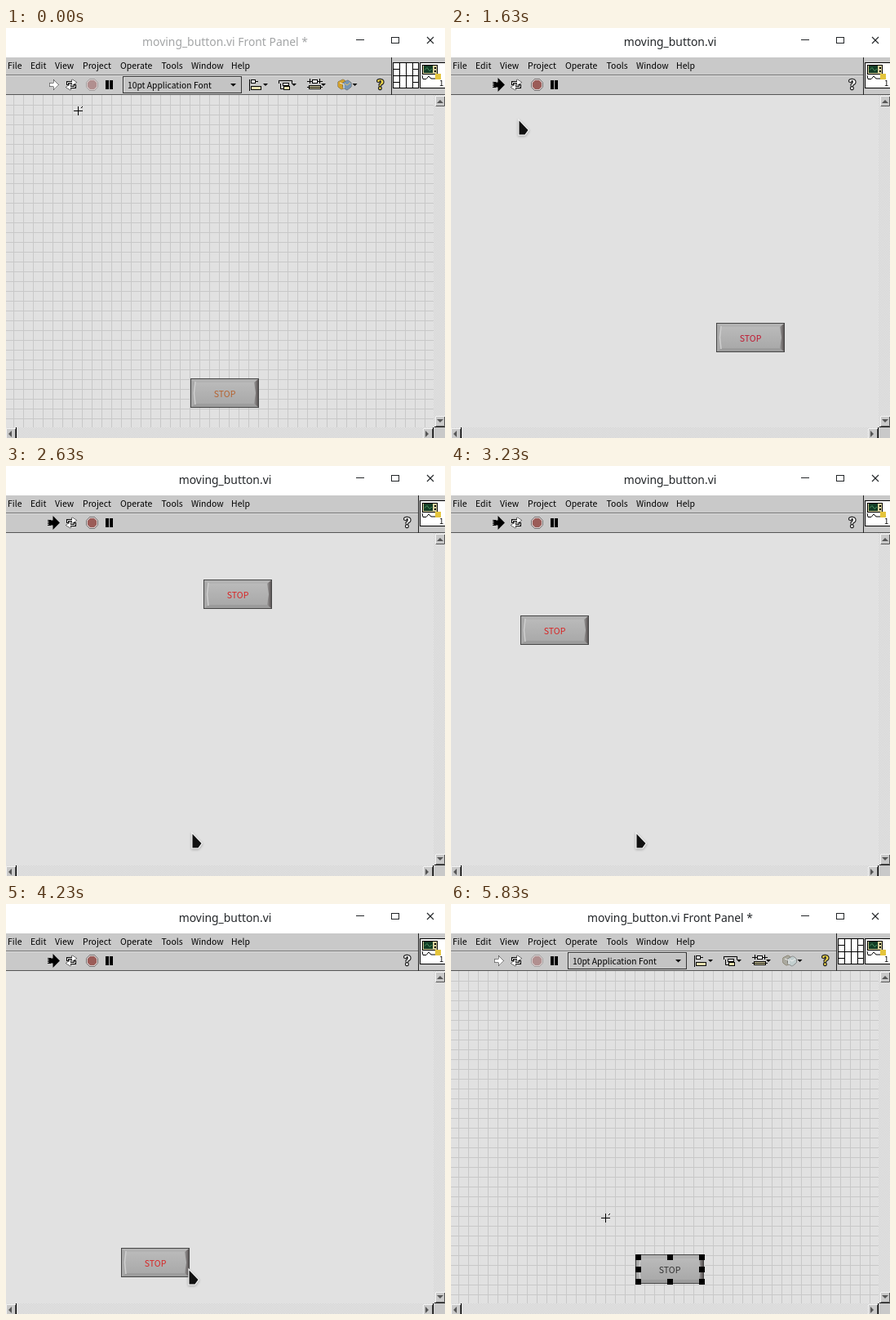
An HTML page with a canvas for the animation above (6030 ms loop, 538 by 502 pixels).

```html
<!DOCTYPE html>
<html lang="en">
<head>
<meta charset="utf-8">
<title>moving_button.vi</title>
<style>
html, body { margin: 0; width: 100%; height: 100%; overflow: hidden; background: #fff; }
canvas { display: block; }
</style>
</head>
<body>
<canvas id="stage" width="538" height="502"></canvas>
<script>
const ctx = document.getElementById('stage').getContext('2d');
const LOOP = 6030;
const UI = '"Noto Sans CJK JP", "Noto Sans CJK SC", "Noto Sans", sans-serif';
const GREY = '#c9c9c9', INK = '#000';
const RUN_START = 6, RUN_END = 23;
const HOME = [226, 429];

function box(x, y, w, h, color) {
  ctx.fillStyle = color;
  ctx.fillRect(x, y, w, h);
}

function frame(x, y, w, h, color, fill) {
  if (fill) box(x, y, w, h, fill);
  ctx.strokeStyle = color;
  ctx.lineWidth = 1;
  ctx.strokeRect(x + 0.5, y + 0.5, w - 1, h - 1);
}

function poly(points, fill, stroke, width = 1) {
  ctx.beginPath();
  for (let i = 0; i < points.length; i += 2) ctx.lineTo(points[i], points[i + 1]);
  ctx.closePath();
  if (stroke) {
    ctx.strokeStyle = stroke;
    ctx.lineWidth = width;
    ctx.stroke();
  }
  if (fill) {
    ctx.fillStyle = fill;
    ctx.fill();
  }
}

function path(points, color = INK, width = 1) {
  ctx.beginPath();
  for (let i = 0; i < points.length; i += 2) ctx.lineTo(points[i], points[i + 1]);
  ctx.strokeStyle = color;
  ctx.lineWidth = width;
  ctx.stroke();
}

function label(str, x, y, size, color = INK, align = 'left', family = UI) {
  ctx.font = size + 'px ' + family;
  ctx.textAlign = align;
  ctx.fillStyle = color;
  ctx.fillText(str, x, y);
}

const lerp = (a, b, k) => a + (b - a) * k;

// keys: [step, x, y]
function along(keys, n) {
  let i = 0;
  while (i < keys.length - 2 && n > keys[i + 1][0]) i++;
  const a = keys[i], b = keys[i + 1];
  const k = Math.min(1, Math.max(0, (n - a[0]) / (b[0] - a[0])));
  return [Math.round(lerp(a[1], b[1], k)), Math.round(lerp(a[2], b[2], k))];
}

const checker = (() => {
  const tile = document.createElement('canvas');
  tile.width = tile.height = 2;
  const c = tile.getContext('2d');
  c.fillStyle = '#f0f0f0';
  c.fillRect(0, 0, 2, 2);
  c.fillStyle = GREY;
  c.fillRect(0, 0, 1, 1);
  c.fillRect(1, 1, 1, 1);
  return ctx.createPattern(tile, 'repeat');
})();

function titleBar(n, running) {
  box(0, 0, 538, 36, '#fff');
  const text = running ? 'moving_button.vi' : 'moving_button.vi Front Panel *';
  label(text, 268.5, 22, 13.9, n < 2 ? '#a3a5a6' : '#232629', 'center', '"Noto Sans", sans-serif');
  box(429, 14, 10, 1, '#232629');
  frame(472, 11, 10, 8, '#232629');
  path([516, 11, 524, 19], '#232629', 1.1);
  path([524, 11, 516, 19], '#232629', 1.1);
}

function menuBar() {
  box(0, 36, 538, 46, GREY);
  const items = [['File', 2], ['Edit', 30], ['View', 60], ['Project', 94],
    ['Operate', 140], ['Tools', 190.5], ['Window', 227], ['Help', 276]];
  for (const [text, x] of items) label(text, x, 50, 10.5);
}

function runArrow(running, hover) {
  if (hover) frame(49, 59, 19, 21, '#222', '#d8d8d8');
  const arrow = [53.5, 67.5, 58.5, 67.5, 58.5, 63.5, 64.5, 69.5, 58.5, 75.5, 58.5, 71.5, 53.5, 71.5];
  poly(arrow, running ? INK : '#fff', INK, running ? 2 : 1);
  if (running) for (let y = 66; y < 74; y += 2) box(51, y, 4, 1, INK);
}

function loopArrows() {
  path([75.5, 70, 75.5, 66.5, 82, 66.5], INK, 3);
  path([84.5, 69, 84.5, 72.5, 78, 72.5], INK, 3);
  poly([81, 63, 86.5, 66.5, 81, 70], '#fff', INK);
  poly([79, 69, 73.5, 72.5, 79, 76], '#fff', INK);
  path([75.5, 69, 75.5, 66.5, 82, 66.5], '#fff');
  path([84.5, 70, 84.5, 72.5, 78, 72.5], '#fff');
}

function abortButton(running) {
  poly([102.5, 62.5, 108.5, 62.5, 112.5, 66.5, 112.5, 72.5, 108.5, 76.5, 102.5, 76.5, 98.5, 72.5, 98.5, 66.5],
    '#d6cccc', running ? '#222' : '#777');
  poly([103, 64, 108, 64, 111, 67, 111, 72, 108, 75, 103, 75, 100, 72, 100, 67],
    running ? '#9b5c58' : '#b18f8f');
}

function caret(x, y, half = 3) {
  poly([x - half, y, x + half, y, x, y + half], INK);
}

function editTools(n) {
  frame(143, 59, 146, 21, '#333', '#c4c4c4');
  path([144.5, 78, 144.5, 60.5, 287, 60.5], '#dedede');
  label('10pt Application Font', 149, 74, 10.3);
  caret(278.5, 68, 3.5);

  // align
  box(298, 63, 1, 14, INK);
  frame(300, 63, 6, 5, INK, '#fff');
  frame(300, 71, 13, 5, INK, '#e8e1b0');
  box(306, 65, 3, 1, INK);
  caret(318, 68);
  // distribute
  box(334, 64, 17, 1, INK);
  box(334, 64, 1, 4, INK);
  box(350, 64, 1, 4, INK);
  frame(339, 67, 8, 4, INK, '#fff');
  path([336.5, 68, 336.5, 74.5, 340, 74.5], INK);
  frame(340, 71, 8, 5, INK, '#e8e1b0');
  caret(353, 68);
  // resize
  box(372, 62, 1, 6, INK);
  box(384, 62, 1, 6, INK);
  box(369, 65, 19, 1, INK);
  frame(375, 63, 7, 5, INK, '#fff');
  frame(371, 70, 15, 5, INK, '#e8e1b0');
  box(369, 72, 19, 1, INK);
  caret(389, 68);
  // reorder
  const vivid = n < RUN_START;
  const gold = vivid ? '#d3a12d' : '#aaa99f', blue = vivid ? '#7795b5' : '#c3cfcf';
  poly([407, 66, 413, 63, 416, 65, 416, 73, 411, 75, 407, 72], gold, '#665c40');
  poly([413, 67, 419, 64, 423, 67, 423, 72, 418, 76, 413, 73], blue, '#555');
  path([409, 67, 414, 69, 414, 74], '#eee');
  path([415, 68, 418, 70, 422, 67], vivid ? '#e7c464' : '#eee');
  caret(427.5, 68);
}

function helpMark(x, color) {
  ctx.font = 'bold 16px "Noto Serif", serif';
  ctx.textAlign = 'center';
  ctx.lineJoin = 'round';
  ctx.lineWidth = 2.4;
  ctx.strokeStyle = '#222';
  ctx.strokeText('?', x, 75);
  ctx.fillStyle = color;
  ctx.fillText('?', x, 75);
  ctx.lineJoin = 'miter';
}

function panes(running) {
  const left = running ? 505 : 472;
  box(left, 36, 1, 46, '#222');
  if (!running) {
    frame(474, 42, 32, 32, INK, '#fff');
    for (const x of [482, 490, 498]) box(x, 42, 1, 32, INK);
    for (const y of [50, 58, 66]) {
      box(474, y, 8, 1, INK);
      box(498, y, 8, 1, INK);
    }
    box(482, 58, 16, 1, INK);
  }
  frame(507, 42, 32, 32, INK, '#fff');
  frame(510, 45, 19, 12, INK, '#d6cf9c');
  box(512, 46, 11, 9, '#123c25');
  path([513, 51.5, 516, 48.5, 519, 52.5, 522, 50], '#4c9261');
  box(525, 48, 2, 2, INK);
  box(525, 52, 2, 2, INK);
  path([510, 58, 511, 62.5, 515, 62.5, 518, 59, 521, 62, 526, 62], INK);
  box(526, 56, 7, 7, '#e4c43c');
  label('1', 531, 71, 9.5);
}

function scrollButton(x, y, arrow) {
  box(x, y, 12, 13, GREY);
  path([x + 0.5, y + 12, x + 0.5, y + 0.5, x + 12, y + 0.5], '#f4f4f4');
  path([x + 1, y + 12.5, x + 11.5, y + 12.5, x + 11.5, y + 1], '#555');
  poly(arrow, '#555');
}

function scrollBars() {
  box(524, 82, 14, 407, checker);
  box(0, 489, 524, 13, checker);
  scrollButton(526, 83, [528, 92, 536, 92, 532, 88]);
  scrollButton(526, 475, [528, 479, 536, 479, 532, 483]);
  scrollButton(0, 490, [7, 493, 7, 501, 3, 497]);
  scrollButton(511, 490, [514, 493, 514, 501, 518, 497]);
  box(12, 489, 1, 13, INK);
  box(523, 489, 1, 13, INK);
  box(524, 489, 14, 13, GREY);
  box(525, 488, 13, 1, '#222');
}

function panel(running) {
  box(0, 82, 524, 407, '#e1e1e1');
  if (!running) {
    for (let x = 9; x < 524; x += 12) box(x, 82, 1, 407, '#c8c8c8');
    for (let y = 94; y < 489; y += 12) box(0, y, 524, 1, '#c8c8c8');
  }
  box(0, 81, 538, 1, '#555');
  box(0, 57, running ? 505 : 472, 1, '#777');
  box(0, 58, running ? 505 : 472, 1, '#dcdcdc');
}

function stopButton(x, y, color) {
  const shade = ctx.createLinearGradient(0, y, 0, y + 36);
  shade.addColorStop(0, '#bdbdbd');
  shade.addColorStop(1, '#a6a6a6');
  frame(x, y, 84, 36, '#454545', shade);
  poly([x + 1, y + 1, x + 83, y + 1, x + 79, y + 5, x + 6, y + 5], '#b2b2b2');
  poly([x + 1, y + 35, x + 83, y + 35, x + 79, y + 31, x + 6, y + 31], '#9c9c9c');
  poly([x + 1, y + 1, x + 6, y + 5, x + 4, y + 18, x + 6, y + 31, x + 1, y + 35], '#a9a9a9');
  path([x + 6, y + 4, x + 4.5, y + 18, x + 6, y + 32], '#cfcfcf', 1.5);
  const edge = ctx.createLinearGradient(x + 77, 0, x + 83, 0);
  edge.addColorStop(0, '#a8a8a8');
  edge.addColorStop(1, '#5b5555');
  poly([x + 83, y + 1, x + 83, y + 35, x + 78, y + 31, x + 80, y + 18, x + 78, y + 5], edge);
  label('STOP', x + 42, y + 23, 10.6, color, 'center');
}

// The button circles counter-clockwise while the program runs.
function buttonPlace(n) {
  if (n <= RUN_START || n >= RUN_END) return HOME;
  const deg = n < 13 ? 31.4 - 20.84 * (n - 8) : -72.8 - 21.88 * (n - 13);
  const a = deg * Math.PI / 180;
  return [Math.round(197.4 + 150 * Math.cos(a)), Math.round(282.5 + 150 * Math.sin(a))];
}

function textColor(n) {
  if (n >= RUN_END) return '#333';
  if (n <= RUN_START) return '#b5622f';
  return n < 13 ? '#c01830' : '#d82424';
}

function handles(x, y) {
  for (const dx of [3, 42, 81])
    for (const dy of [3, 18, 33])
      if (dx !== 42 || dy !== 18) box(x + dx - 3, y + dy - 3, 7, 7, INK);
}

function crosshair(x, y) {
  box(x - 5, y, 11, 1, INK);
  box(x, y - 5, 1, 11, INK);
  box(x + 4, y - 4, 1, 1, INK);
  box(x + 5, y - 5, 1, 1, INK);
}

function arrowCursor(x, y) {
  poly([x, y, x, y + 11, x + 2.5, y + 9, x + 4.5, y + 13, x + 6.5, y + 12, x + 4.8, y + 8, x + 8, y + 8],
    INK, '#fff', 2);
}

function runCursor(x, y) {
  ctx.save();
  ctx.shadowColor = 'rgba(0,0,0,.3)';
  ctx.shadowBlur = 3;
  ctx.shadowOffsetY = 1;
  const shape = [x + 0.5, y + 0.5, x + 11.5, y + 12, x + 7.5, y + 17.5, x + 0.5, y + 17.5];
  poly(shape, null, '#f4f4f4', 2.5);
  ctx.restore();
  poly(shape, '#111');
}

function cursor(n) {
  if (n >= RUN_END) {
    const keys = [[23, 224, 447], [24, 228, 456], [26, 228, 456], [29, 189, 384]];
    crosshair(...along(keys, n));
  } else if (n <= RUN_START) {
    const spot = along([[0, 88, 101], [5, 57, 77]], n);
    (n < 4 ? crosshair : arrowCursor)(...spot);
  } else {
    const keys = [[6, 57, 77], [8, 83, 113], [12, 228, 450], [13, 228, 450], [19, 225, 449], [22, 224, 447]];
    runCursor(...along(keys, n));
  }
}

function stepAt(t) {
  return t < 1030 ? Math.min(4, Math.floor(t / 200)) : 5 + Math.floor((t - 1030) / 200);
}

function draw(n) {
  const running = n >= RUN_START && n < RUN_END;
  titleBar(n, running);
  menuBar();
  panel(running);
  runArrow(running, n === 5);
  loopArrows();
  abortButton(running);
  box(122, 64, 4, 11, INK);
  box(127, 64, 4, 11, INK);
  if (!running) editTools(n);
  helpMark(running ? 492 : 459, running ? '#fff' : '#f0d84a');
  panes(running);
  const [x, y] = buttonPlace(n);
  stopButton(x, y, textColor(n));
  if (n > RUN_END) handles(x, y);
  scrollBars();
  cursor(n);
}

const start = performance.now();
function tick() {
  draw(stepAt((performance.now() - start) % LOOP));
  requestAnimationFrame(tick);
}
tick();
</script>
</body>
</html>
```
